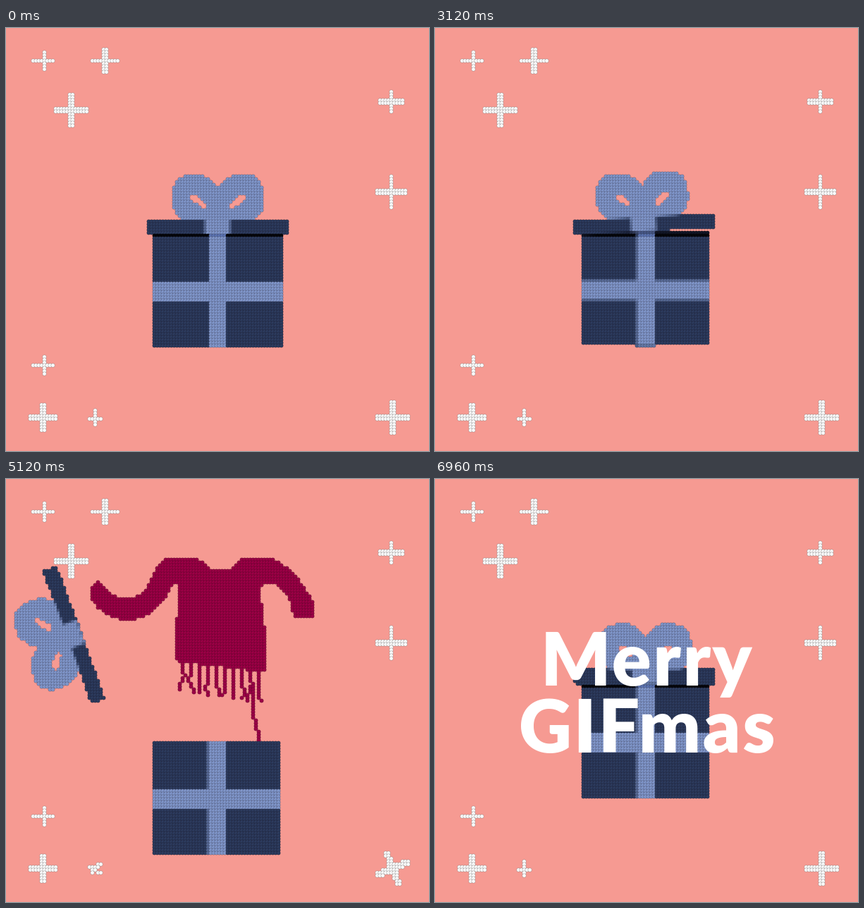
Recreate the animation shown at these times as an HTML page with a canvas. Size 600 px wide and 600 px high, loop 9 s.

```html
<!DOCTYPE html>
<html lang="en">
<head>
<meta charset="utf-8">
<title>Gift</title>
<style>
  html, body { margin: 0; width: 100%; height: 100%; overflow: hidden; background: #f69a92; }
  canvas, svg { position: absolute; left: 0; top: 0; width: 100%; height: 100%; display: block; }
  text { font: 900 104px Lato, "Open Sans", sans-serif; letter-spacing: .024em; fill: #fff; text-anchor: middle; }
</style>
</head>
<body>
<canvas id="stage" width="600" height="600"></canvas>
<svg id="title" viewBox="0 0 600 600" visibility="hidden">
  <text x="301" y="293">Merry</text>
  <text x="302" y="388">GIFmas</text>
</svg>
<script>
const LOOP = 9000, STEP = 40, CELL = 4, N = 150;
const BG = '#f69a92', NAVY = '#2d3b5e', BLUE = '#8096ca', SHADE = '#5d74b2', RED = '#9c0046';

const stage = document.getElementById('stage').getContext('2d');
const title = document.getElementById('title');
const low = document.createElement('canvas');
low.width = low.height = N;
const g = low.getContext('2d', { willReadFrequently: true });

const clamp = v => Math.max(0, Math.min(1, v));
const span = (t, a, b) => clamp((t - a) / (b - a));
const lerp = (a, b, p) => a + (b - a) * p;
const smooth = p => p * p * (3 - 2 * p);
const ease = (p, n) => p < .5 ? 2 ** (n - 1) * p ** n : 1 - 2 ** (n - 1) * (1 - p) ** n;

function rect(color, x, y, w, h) {
  g.fillStyle = color;
  g.fillRect(x, y, w, h);
}

// Sparkles: box x, y, w, h; upright x and width; bar y and height; angles at SPIN times
const SPIN = [3080, 3800, 5120, 5880, 6240];
const sparkles = [
  [36, 32, 32, 28, 52, 4, 44, 4, [0, 22, 0, 9, 0]],
  [120, 28, 40, 36, 136, 8, 44, 4],
  [68, 92, 48, 48, 88, 8, 112, 8, [0, -11, -3, -11, 0]],
  [528, 88, 36, 32, 544, 4, 100, 8],
  [524, 208, 44, 48, 544, 4, 228, 8],
  [36, 464, 32, 28, 52, 4, 476, 4],
  [32, 532, 40, 40, 48, 8, 548, 8],
  [116, 540, 20, 24, 124, 4, 552, 4, [0, 26, 35, 0, 0]],
  [524, 528, 48, 48, 544, 8, 548, 8, [0, -12, -22, 16, 0]]
];

function angleAt(t, angles) {
  if (!angles) return 0;
  let a = angles[0];
  for (let i = 1; i < SPIN.length; i++) a += (angles[i] - angles[i - 1]) * span(t, SPIN[i - 1], SPIN[i]);
  return a * Math.PI / 180;
}

function drawSparkles(t) {
  for (const [x, y, w, h, vx, vw, hy, hh, angles] of sparkles) {
    const cx = vx + vw / 2, cy = hy + hh / 2;
    g.save();
    g.translate(cx, cy);
    g.rotate(angleAt(t, angles));
    g.translate(-cx, -cy);
    rect('#fafafa', vx, y, vw, h);
    rect('#fafafa', x, hy, w, hh);
    g.restore();
  }
}

const sweater = new Path2D(
  'M228 112H268Q280 116 290 128H318Q328 114 338 112H378Q410 128 432 168L437 178V196H408' +
  'Q404 162 378 146H366L358 154V172L362 176V200L366 206V228L369 232V296L365 300V318' +
  'L350 311L300 304L284 300H252L244 292V260L240 256V208L244 186V146H240L233 154' +
  'Q218 184 198 193Q175 205 148 195Q128 184 120 170V154L130 144Q146 166 168 168' +
  'Q190 170 200 156Q210 120 228 112Z');

// One-bead-wide yarn whose x follows a function of 0..1
function yarn(xAt, y0, y1) {
  g.fillStyle = RED;
  for (let y = Math.floor(y0 / CELL) * CELL; y < y1; y += CELL) {
    const x = xAt(clamp((y - y0) / (y1 - y0)), y);
    g.fillRect(Math.floor(x / CELL) * CELL, y, CELL, CELL);
  }
}

function drawSweater(t) {
  const s = smooth(span(t, 3160, 3720)) * (1 - smooth(span(t, 5880, 6180)));
  if (s < .02) return;
  const p = span(t, 3840, 5640), u = 1 - (1 - p) ** 1.7;
  const edge = x => 302 - 50 * u + (x - 250) * .13;

  g.save();
  g.translate(300, lerp(400, 300, s));
  g.scale(s, s);
  g.translate(-300, -300);

  g.save();
  g.beginPath();
  g.moveTo(0, 0);
  g.lineTo(600, 0);
  g.lineTo(600, edge(600));
  g.lineTo(0, edge(0));
  g.clip();
  g.fillStyle = RED;
  g.fill(sweater);
  g.restore();

  if (u > .05) {
    const phase = Math.floor(p * 12);
    for (let k = 0; k < 10; k++) {
      const x = 250 + 12 * k, sway = 2 + 2.5 * Math.abs(Math.sin(k * 2.3 + phase));
      yarn((q, y) => x + sway * q * Math.sin(y * .16 + k * 2.1 + phase), edge(x) - 4, 300 + (x - 250) * .13);
    }
  }

  // Loose end sweeps along the hem and drops into the box
  const c = Math.cos(p * Math.PI * 6), grow = span(t, 3800, 4100);
  const x0 = 303 + 60 * c, dx = 13 + 5 * c + 10 * (1 - grow);
  yarn(q => x0 + dx * q + 2 * Math.sin(q * 9), edge(x0) - 4, lerp(357, 384, grow));
  g.restore();
}

function drawBox(y, moved, e) {
  const w = moved ? 180 : 184, rx = moved ? 286 : 288, rw = 312 - rx;
  rect(NAVY, 208, y, w, 160);
  rect(BLUE, rx, y, rw, 160);
  rect(BLUE, 208, y + 68, w, 28);
  const sh = 4 + 2 * clamp(e / .03);
  g.globalAlpha = 1 - span(e, .1, .35);
  rect('#06070c', 208, y, w, sh);
  rect(SHADE, rx, y, rw, sh);
  g.globalAlpha = 1;
}

// Bow half, drawn left of the centre line and mirrored for the right
const loop = new Path2D(
  'M301 228C294 222 288 212 278 208H256C246 210 236 222 236 232V250C236 258 244 266 250 272H301Z' +
  'M261 237H271L284 249V256H278L262 244Z');

function drawLid(x, y, angle) {
  g.save();
  g.translate(x, y);
  g.rotate(angle);
  g.translate(-300, -282);
  rect(NAVY, 200, 271.7, 200, 20.3);
  rect(BLUE, 282, 262, 36, 30);
  g.fillStyle = BLUE;
  g.fill(loop, 'evenodd');
  g.translate(601, 0);
  g.scale(-1, 1);
  g.fill(loop, 'evenodd');
  g.restore();
}

// Damped bounce, positive is up
function bounce(t) {
  const d = t - 1400;
  return d <= 0 || d >= 800 ? 0 : 136 * Math.exp(-.0045 * d) * Math.sin(Math.PI * d / 267);
}

function drawScene(t) {
  g.setTransform(1, 0, 0, 1, 0, 0);
  g.clearRect(0, 0, N, N);
  g.scale(1 / CELL, 1 / CELL);
  drawSparkles(t);

  const moved = t >= 2720;
  if (!moved) {
    const up = bounce(t), gap = t > 1400 && t < 2160 ? 3 : 0;
    drawBox(292 - up, false, 0);
    drawLid(300, 282 - up - gap, 0);
    return;
  }
  const q = span(t, 2920, 3720);
  const e = ease(q, 4) - ease(span(t, 5680, 6240), 7);
  const hop = q < .5 ? 4.7 * Math.sin(q * 2 * Math.PI) : 0;
  const lift = 50 * e * Math.sin(Math.PI * e);
  drawSweater(t);
  drawBox(292 + 80 * Math.min(1, e * 1.05) - hop, true, e);
  drawLid(lerp(297.5, 96, e ** 1.35), lerp(280.1, 220, e) - lift, -e * 110 * Math.PI / 180);
}

const beads = new Map();
function bead(r, gr, b) {
  const key = r << 16 | gr << 8 | b;
  let c = beads.get(key);
  if (!c) {
    c = document.createElement('canvas');
    c.width = c.height = 9;
    const k = c.getContext('2d');
    k.fillStyle = `rgb(${r},${gr},${b})`;
    k.strokeStyle = 'rgba(0,0,0,.27)';
    k.lineWidth = .7;
    k.beginPath();
    k.arc(4.5, 4.5, 2.75, 0, 7);
    k.fill();
    k.stroke();
    beads.set(key, c);
  }
  return c;
}

function render(t) {
  drawScene(t);
  const d = g.getImageData(0, 0, N, N).data;
  stage.fillStyle = BG;
  stage.fillRect(0, 0, 600, 600);
  for (let i = 0; i < N * N; i++) {
    const o = i * 4;
    if (d[o + 3] < 126) continue;
    stage.drawImage(bead(d[o], d[o + 1], d[o + 2]), i % N * CELL - 2, Math.floor(i / N) * CELL - 2);
  }
  title.setAttribute('visibility', t >= 6960 ? 'visible' : 'hidden');
}

const start = performance.now();
let last = -1;
function tick() {
  const t = Math.floor((performance.now() - start) % LOOP / STEP) * STEP;
  if (t !== last) render(last = t);
  requestAnimationFrame(tick);
}
tick();
</script>
</body>
</html>
```
